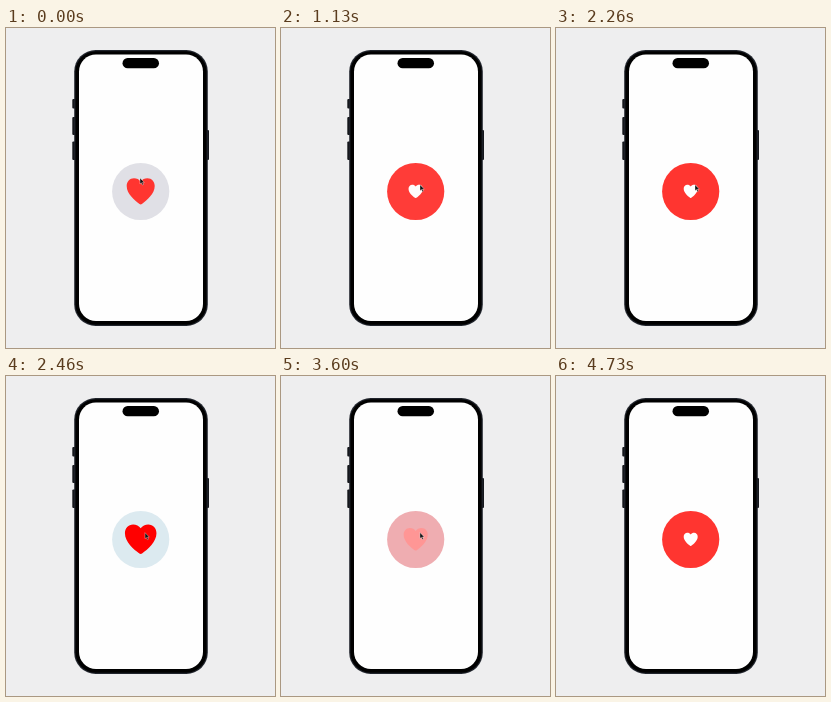
An HTML page that plays this animation: 269x320 px, repeating every 4.93 s.

```html
<!DOCTYPE html>
<html lang="en">
<head>
<meta charset="utf-8">
<title>Like button</title>
<style>
  html, body { margin: 0; width: 100%; height: 100%; overflow: hidden; background: #eeeeef; }
  svg { display: block; width: 100%; height: 100%; }
</style>
</head>
<body>
<svg viewBox="0 0 269 320">
  <g fill="#15171c">
    <rect x="66.3" y="71" width="4" height="9.5" rx="1"/>
    <rect x="66.3" y="89" width="4" height="18" rx="1"/>
    <rect x="66.3" y="113.5" width="4" height="18.5" rx="1"/>
    <rect x="199" y="102" width="4" height="30" rx="1"/>
  </g>
  <rect x="68.2" y="22" width="133.6" height="276" rx="21.5" fill="#20242c"/>
  <rect x="69.4" y="23.2" width="131.2" height="273.6" rx="20.5" fill="#000"/>
  <rect x="73" y="26.5" width="124" height="266.5" rx="17" fill="#fefefe"/>
  <rect x="116.5" y="30" width="36.5" height="10.3" rx="5.15" fill="#000"/>
  <circle id="disc" cx="134.7" cy="163.5" r="28.6"/>
  <path id="heart" d="M0-9.8C-1.5-12-4-13.2-6.7-13.2C-11-13.2-14-9.8-14-5.4C-14 2.5-6 9-1.2 12.6Q0 13.4 1.2 12.6C6 9 14 2.5 14-5.4C14-9.8 11-13.2 6.7-13.2C4-13.2 1.5-12 0-9.8Z"/>
  <path id="cursor" d="M0 0V6L1.4 4.8L2.4 7L3.5 6.5L2.5 4.4H4.3Z" fill="#111" stroke="#fff" stroke-opacity=".7" stroke-width=".5"/>
</svg>
<script>
const LOOP = 4930, CURSOR_GONE = 4570;
const RED = [255, 53, 48], GRAY = [224, 224, 230], WHITE = [255, 255, 255];
const TAPS = [735, 2296, 3560];
const DISC_LEAD = 15;
// time, x, y
const CURSOR_PATH = [
  [0, 134, 150], [60, 134, 150], [460, 139, 156.7], [3600, 139, 156.7],
  [3930, 117.7, 109], [4060, 113, 97], [4570, 73, 10]
];
const [disc, heart, cursor] = ["disc", "heart", "cursor"].map(id => document.getElementById(id));

// Underdamped spring: response 0.3 s, damping fraction 0.4
function spring(ms) {
  if (ms <= 0) return 0;
  const t = ms / 1000, zeta = 0.4, omega = 2 * Math.PI / 0.3;
  const root = Math.sqrt(1 - zeta * zeta), phase = omega * root * t;
  return 1 - Math.exp(-zeta * omega * t) * (Math.cos(phase) + zeta / root * Math.sin(phase));
}

function liked(time, transform = p => p) {
  return TAPS.reduce((from, tap, i) => {
    const to = i % 2 ? 0 : 1;
    return time < tap ? from : from + (to - from) * transform(spring(time - tap));
  }, 0);
}

const softenOvershoot = p => p > 1 ? 1 + (p - 1) * 0.45 : p;
const toLinear = v => (v /= 255) <= 0.04045 ? v / 12.92 : ((v + 0.055) / 1.055) ** 2.4;
const toByte = v => {
  v = Math.min(1, Math.max(0, v));
  return Math.round(255 * (v <= 0.0031308 ? v * 12.92 : 1.055 * v ** (1 / 2.4) - 0.055));
};
const mix = (a, b, p) => a + (b - a) * p;
const mixColor = (a, b, p) =>
  `rgb(${a.map((v, i) => toByte(mix(toLinear(v), toLinear(b[i]), p)))})`;

function cursorAt(time) {
  const i = Math.max(1, CURSOR_PATH.findIndex(point => point[0] >= time));
  const [t0, x0, y0] = CURSOR_PATH[i - 1], [t1, x1, y1] = CURSOR_PATH[i];
  const p = (time - t0) / (t1 - t0);
  return [mix(x0, x1, p), mix(y0, y1, p)];
}

function draw(now) {
  const time = now % LOOP, p = liked(time);
  disc.setAttribute("fill", mixColor(GRAY, RED, liked(time + DISC_LEAD, softenOvershoot)));
  heart.setAttribute("fill", mixColor(RED, WHITE, p));
  heart.setAttribute("transform", `translate(134.7 163.4) scale(${1 - p / 2})`);
  const visible = time < CURSOR_GONE;
  cursor.setAttribute("visibility", visible ? "visible" : "hidden");
  if (visible) cursor.setAttribute("transform", `translate(${cursorAt(time)})`);
}

const start = performance.now();
function frame() {
  draw(performance.now() - start);
  requestAnimationFrame(frame);
}
frame();
</script>
</body>
</html>
```
